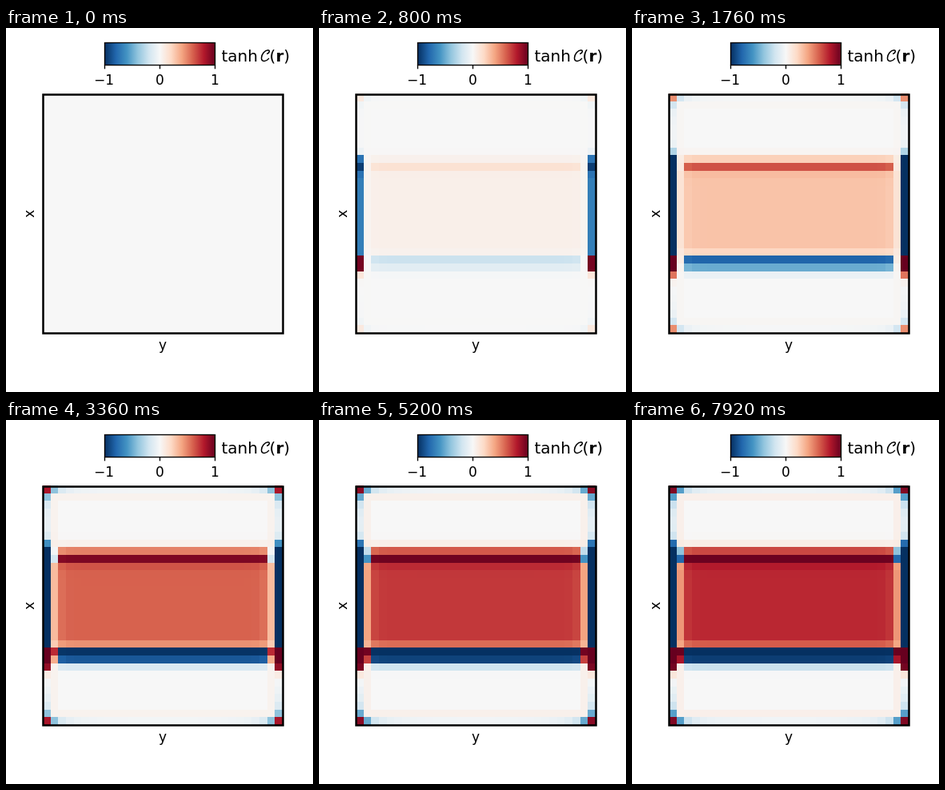
Animation, 384 px wide and 456 px high, one loop 8 s. Source, as an HTML page with a canvas:

```html
<!DOCTYPE html>
<html lang="en">
<head>
<meta charset="utf-8">
<style>
html, body { margin: 0; width: 384px; height: 456px; overflow: hidden; background: #fff; }
canvas { display: block; }
</style>
</head>
<body>
<canvas id="stage" width="384" height="456"></canvas>
<script>
const ctx = document.getElementById('stage').getContext('2d');
const LOOP = 8000, STEP = 80, N = 31;
const TOP = 8, SHEET = 21, BOTTOM = 22; // rows of the band
const FONT = '"DejaVu Sans", sans-serif';

// diverging colour scale, -1 to 1
const scale = ['#053061', '#2166ac', '#4393c3', '#92c5de', '#d1e5f0', '#f7f7f7',
  '#fddbc7', '#f4a582', '#d6604d', '#b2182b', '#67001f'];
const rgb = scale.map(h => [1, 3, 5].map(i => parseInt(h.slice(i, i + 2), 16)));

const bump = (d, k = 2.3) => Math.exp(-k * d * d);

// overall growth: slow start, then saturation
function level(n) {
  const p = (n / 32.6) ** 2.4;
  return 1.06 * p / (1 + p);
}

// oscillation that dies out along the frame from each corner
const ripple = k => k === 0 ? 1.7 : -.03 - .6 / k ** 1.7;

// outermost column: strong inside the band, decaying beyond it
function wall(r) {
  if (r < TOP) return -((TOP - r) ** -2.8);
  if (r > BOTTOM) return 2.1 * (r - BOTTOM) ** -3.6;
  return r >= SHEET ? 34 : -14.5 - 17 * bump(r - TOP - 1);
}

// flat plateau with softer first and last rows
function plateau(r) {
  if (r < TOP) return .75 * .09 ** (TOP - r);
  if (r >= SHEET) return 0;
  return r === TOP || r === SHEET - 1 ? .72 : 1;
}

// warm line near the top of the band, cold sheet at its bottom
const layers = r => r < SHEET
  ? 1.55 * .06 ** Math.abs(r - TOP - 1)
  : -3.75 * bump(r - SHEET, .7);

// late growth where the layers meet the wall
const pinch = r => 3.7 * bump(r - SHEET - .3) - 2.1 * bump(r - TOP - .65);

function field(r, side, g) {
  const end = Math.min(r, N - 1 - r);
  const inBand = r >= TOP && r <= BOTTOM;
  const near = Math.min(side, end);
  let a = 0;
  if (near === 0 && !inBand) a += ripple(Math.max(side, end));
  if (near === 1 && !inBand) a += .055;
  if (side === 0) return (a + wall(r)) * g;
  const taper = 1 - .52 * .15 ** (side - 1);
  a += plateau(r) * taper;
  if (side === 1) return a * g + pinch(r) * g ** 3;
  return (a + layers(r) * taper) * g;
}

function colour(v) {
  const p = (v + 1) * 5;
  const i = Math.min(9, Math.floor(p));
  return `rgb(${rgb[i].map((c, k) => Math.round(c + (rgb[i + 1][k] - c) * (p - i)))})`;
}

const edgeX = k => Math.round(46 + k * 300 / N);
const edgeY = k => Math.round(82 + k * 9.68);

function cells(g) {
  for (let r = 0; r < N; r++) {
    const y = edgeY(r), h = edgeY(r + 1) - y;
    for (let c = 0; c < N; c++) {
      const x = edgeX(c);
      ctx.fillStyle = colour(Math.tanh(field(r, Math.min(c, N - 1 - c), g)));
      ctx.fillRect(x, y, edgeX(c + 1) - x, h);
    }
  }
}

function text(s, x, y, size = 17, align = 'center', weight = '') {
  ctx.font = `${weight} ${size}px ${FONT}`;
  ctx.textAlign = align;
  ctx.fillText(s, x, y);
}

function colourBar() {
  const grad = ctx.createLinearGradient(123.5, 0, 261.5, 0);
  scale.forEach((c, i) => grad.addColorStop(i / 10, c));
  ctx.fillStyle = grad;
  ctx.fillRect(123, 18, 139, 28);
  ctx.lineWidth = 1.33;
  ctx.strokeRect(123.5, 18.5, 138, 28);
  ctx.fillStyle = '#000';
  ['\u22121', '0', '1'].forEach((s, i) => {
    const x = 123.5 + i * 69;
    ctx.beginPath();
    ctx.moveTo(x, 46.5);
    ctx.lineTo(x, 51.3);
    ctx.stroke();
    text(s, x - (i === 0 ? 1 : 0), 71);
  });
}

function scriptC() {
  ctx.lineWidth = 1.5;
  ctx.lineCap = 'round';
  ctx.beginPath();
  ctx.moveTo(326.8, 32.2);
  ctx.bezierCurveTo(329.6, 31.2, 330.6, 27.6, 327.6, 27.7);
  ctx.bezierCurveTo(323.6, 27.9, 319.5, 33, 319.5, 37.6);
  ctx.bezierCurveTo(319.5, 42.8, 325.2, 42.6, 328.6, 38.4);
  ctx.stroke();
  ctx.lineCap = 'butt';
}

function title() {
  text('tanh', 269.5, 42, 20, 'left');
  scriptC();
  text('(', 329.6, 42, 20, 'left');
  text('r', 337.4, 42, 20, 'left', 'bold');
  text(')', 347.3, 42, 20, 'left');
}

function axes() {
  ctx.lineWidth = 2.5;
  ctx.strokeRect(46.5, 83.5, 300, 299);
  text('y', 196, 403);
  ctx.save();
  ctx.translate(35, 232.7);
  ctx.rotate(-Math.PI / 2);
  text('x', 0, 0);
  ctx.restore();
}

function draw(now) {
  const n = Math.floor((now % LOOP) / STEP);
  ctx.fillStyle = '#fff';
  ctx.fillRect(0, 0, 384, 456);
  ctx.strokeStyle = '#000';
  cells(level(n));
  colourBar();
  title();
  axes();
}

const start = performance.now();
function tick() {
  draw(performance.now() - start);
  requestAnimationFrame(tick);
}
tick();
</script>
</body>
</html>
```
